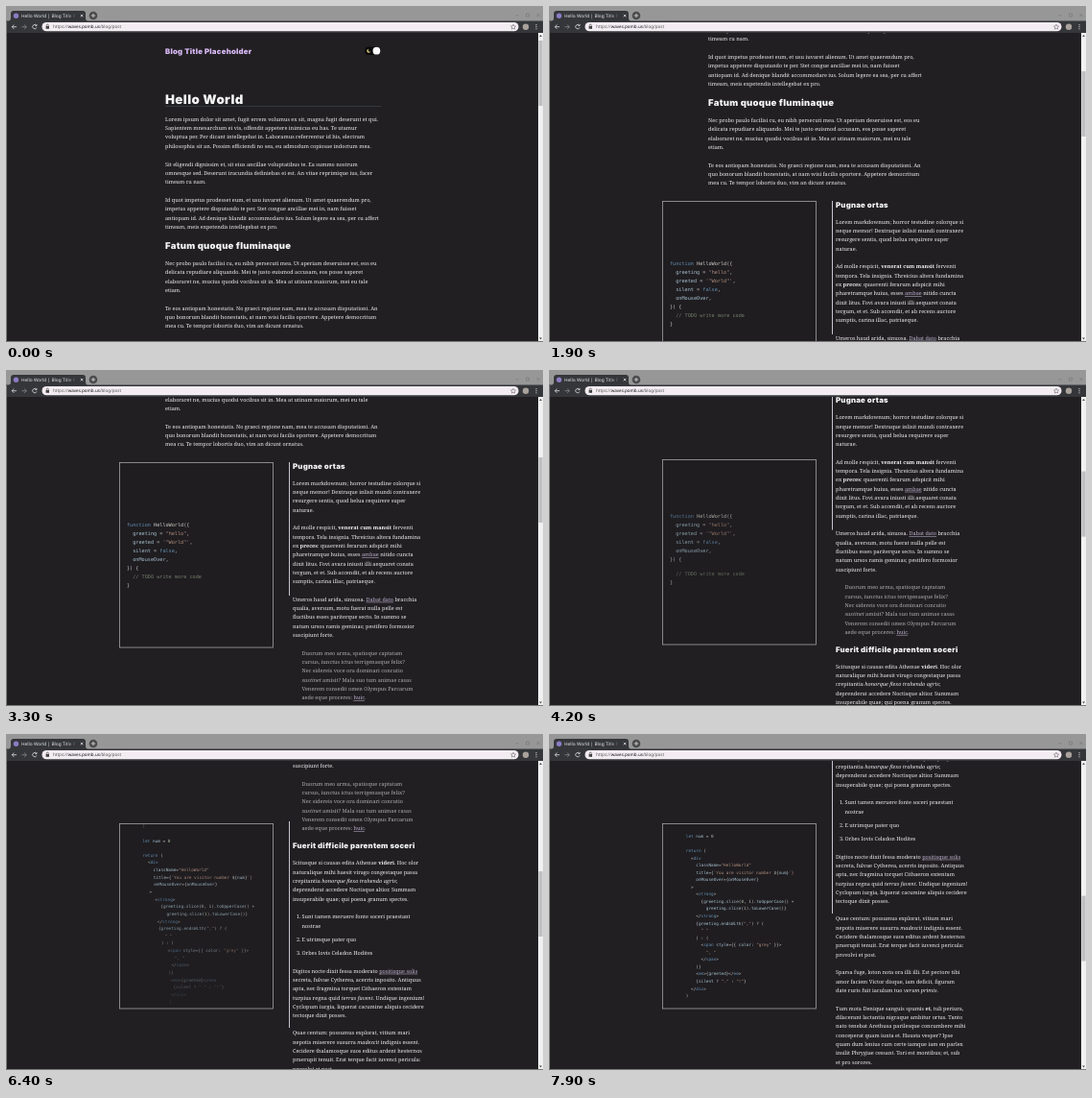
Animation of 560 by 350 pixels, one loop 8 s. Source, as an HTML page:

```html
<!DOCTYPE html>
<html lang="en">
<head>
<meta charset="utf-8">
<title>Scrolling code walkthrough</title>
<style>
  html, body { margin: 0; width: 100%; height: 100%; overflow: hidden; background: #211f22; }
  svg { display: block; width: 560px; height: 350px; text-rendering: geometricPrecision; }
  .body { font: 5.53px "Noto Serif", serif; fill: #efedef; }
  .quote { fill: #aeacae; }
  .head { font-family: Inter, sans-serif; font-weight: 900; letter-spacing: .03em; fill: #f4f4f4; }
  .code { font: 5.18px "DejaVu Sans Mono", monospace; fill: #c6c6c6; }
  .ui { font-family: "Noto Sans", sans-serif; }
  .b { font-weight: 700; }
  .i { font-style: italic; }
  .link { fill: #b9aecb; text-decoration: underline .4px; }
  .keyword { fill: #6591b6; }
  .string { fill: #b38f7e; }
  .name { fill: #a9c4d4; }
  .type { fill: #d2d2c8; }
  .number { fill: #b5c4ac; }
  .comment { fill: #75806c; }
</style>
</head>
<body>
<svg viewBox="0 0 560 350">
  <defs>
    <clipPath id="panelClip"><rect x="119" y="1" width="159" height="192"/></clipPath>
    <linearGradient id="tabFade">
      <stop offset=".82" stop-color="#e6e6e6"/><stop offset="1" stop-color="#e6e6e6" stop-opacity=".1"/>
    </linearGradient>
  </defs>
  <rect width="560" height="350" fill="#211f22"/>

  <g id="page">
    <rect x="374" y="42.5" width="16.5" height="8.5" rx="4.25" fill="#080808"/>
    <circle cx="378.3" cy="46.7" r="2" fill="#e8d58a"/>
    <circle cx="379.3" cy="46" r="1.7" fill="#080808"/>
    <circle cx="386.4" cy="46.7" r="3.9" fill="#fafafa"/>
    <path d="M166 104.5H391" stroke="#3d4848" stroke-width=".7"/>
    <rect id="bar" x="295" width="1" fill="#c9c5d0"/>
  </g>

  <g id="panel">
    <rect x="118.5" y=".5" width="160" height="192.500" fill="#1f1d20" stroke="#a4a4a4" stroke-width=".8"/>
    <g clip-path="url(#panelClip)"><g id="code" class="code"></g></g>
  </g>

  <g id="browser" class="ui">
    <rect width="560" height="16" fill="#979797"/>
    <path d="M2 16Q5 16 5 12V8Q5 5 8 5H80Q83 5 83 8V12Q83 16 86 16Z" fill="#35363a"/>
    <rect y="15.5" width="560" height="12.5" fill="#35363a"/>
    <circle cx="10.5" cy="10.2" r="2.7" fill="#8d7cc4"/>
    <text x="16" y="11.9" font-size="4.8" fill="url(#tabFade)">Hello World | Blog Title P</text>
    <circle cx="91" cy="10" r="4.3" fill="#4a4a4c"/>
    <g fill="none" stroke="#e0e0e0" stroke-width=".8">
      <path d="M77.8 8.8l2.6 2.6m0-2.6l-2.6 2.6M91 7.8v4.4M88.8 10h4.4"/>
      <path d="M11 21.7H6.2m2.2-2.2l-2.2 2.2 2.2 2.2"/>
      <path d="M16.5 21.7h4.8m-2.2-2.2l2.2 2.2-2.2 2.2" stroke="#888"/>
      <path d="M31.8 20.4a2.2 2.2 0 1 0 .2 2M32 18.9v1.7h-1.7"/>
      <path d="M531.5 9.8h3M542.5 8h3v3h-3zM553.5 8l3 3m0-3l-3 3" stroke="#7c7c7c"/>
    </g>
    <rect x="37.5" y="17" width="497" height="9.3" rx="4.6" fill="#f3ecf1"/>
    <rect x="41.6" y="21" width="3.4" height="2.8" fill="#444"/>
    <path d="M42.3 21v-1a1 1 0 0 1 2 0v1" fill="none" stroke="#444" stroke-width=".6"/>
    <text x="49" y="23.3" font-size="4.55" fill="#555">https://<tspan fill="#111">waves.pomb.us</tspan>/blog/post</text>
    <path d="M529 19.2l.8 1.7 1.8.2-1.3 1.2.3 1.8-1.6-.9-1.6.9.3-1.8-1.3-1.2 1.8-.2z" fill="none" stroke="#555" stroke-width=".5"/>
    <circle cx="542" cy="21.7" r="3.2" fill="#a9a29c"/>
    <g fill="#e0e0e0"><circle cx="553" cy="19.6" r=".6"/><circle cx="553" cy="21.7" r=".6"/><circle cx="553" cy="23.8" r=".6"/></g>
    <rect x="555" y="28" width="5" height="322" fill="#f1f0f1"/>
    <path d="M556 32l1.500-2 1.500 2zM556 345.500l1.500 2 1.500-2z" fill="#555"/>
    <rect id="thumb" x="555.400" width="4.200" height="68" fill="#bfbec0"/>
    <path d="M.5 16V349.500H560" fill="none" stroke="#777" stroke-width="1"/>
  </g>
</svg>

<script>
const $ = id => document.getElementById(id);
const clamp = v => Math.max(0, Math.min(1, v));
const mix = (a, b, k) => a + (b - a) * k;
const smooth = v => { v = clamp(v); return v * v * (3 - 2 * v); };

function add(parent, cls, x, y, size) {
  const el = document.createElementNS("http://www.w3.org/2000/svg", "text");
  el.setAttribute("class", cls);
  el.setAttribute("x", x);
  el.setAttribute("y", y);
  if (size) el.setAttribute("font-size", size);
  parent.append(el);
  return el;
}
const span = (cls, s) => `<tspan class="${cls}">${s}</tspan>`;

// Inline marks: **bold**, *italic*, _link_
const inline = s => s
  .replace(/\*\*(.+?)\*\*/g, (_, w) => span("b", w))
  .replace(/\*(.+?)\*/g, (_, w) => span("i", w))
  .replace(/_(.+?)_/g, (_, w) => span("link", w));

function prose(x, y, text, cls = "body") {
  text.split("\n").forEach((line, i) => {
    add($("page"), cls, x, y + 1.7 + i * 9.33).innerHTML = inline(line);
  });
}
function heading(x, y, size, text, color) {
  const el = add($("page"), "head", x, y + size * .36, size);
  el.textContent = text;
  if (color) el.style.fill = color;
}

const L = 166, R = 299, Q = 308.5;
heading(L, 47.5, 7.8, "Blog Title Placeholder", "#d8b9f6");
heading(L, 97, 13.3, "Hello World");
prose(L, 118, `Lorem ipsum dolor sit amet, fugit errem volumus ex sit, magna fugit deserunt et qui.
Sapientem mnesarchum ei vis, offendit appetere inimicus eu has. Te utamur
voluptua per. Per dicant intellegebat in. Laboramus referrentur id his, electram
philosophia sit an. Possim efficiendi no sea, eu admodum copiosae indoctum mea.`);
prose(L, 165, `Sit eligendi dignissim et, sit eius ancillae voluptatibus te. Ea summo nostrum
omnesque sed. Deserunt iracundia definiebas ei est. An vitae reprimique ius, facer
timeam cu nam.`);
prose(L, 202.3, `Id quot impetus prodesset eum, et usu iuvaret alienum. Ut amet quaerendum pro,
impetus appetere disputando te per. Stet congue ancillae mei in, nam fuisset
antiopam id. Ad denique blandit accommodare ius. Solum legere ea sea, per cu affert
timeam, meis expetendis intellegebat ex pro.`);
heading(L, 249.5, 9.5, "Fatum quoque fluminaque");
prose(L, 268.2, `Nec probo paulo facilisi cu, eu nibh persecuti mea. Ut aperiam deseruisse est, eos eu
delicata repudiare aliquando. Mei te justo euismod accusam, eos posse saperet
elaboraret ne, mucius quodsi vocibus sit in. Mea at utinam maiorum, mei eu tale
etiam.`);
prose(L, 315, `Te eos antiopam honestatis. No graeci regione nam, mea te accusam disputationi. An
quo bonorum blandit honestatis, at nam wisi facilis oportere. Appetere democritum
mea cu. Te tempor lobortis duo, vim an dicunt ornatus.`);
heading(R, 355.7, 7.8, "Pugnae ortas");
prose(R, 374, `Lorem markdownum; horror testudine colorque si
neque memor! Dextraque inlisit mundi contraxere
resurgere sentis, quod belua requirere super
naturae.`);
prose(R, 420.5, `Ad molle respicit, **venerat cum mansit** ferventi
tempora. Tela insignia. Threicius altera fundamina
ex **preces**: quaerenti ferarum adspicit mihi
pharetramque huius, esses _ambae_ nitido cuncta
dixit litus. Fovi avara iniusti illi aequaret conata
tergum, et et. Sub accendit, et ab recens auctore
sumptis, carina illac, patriaeque.`);
prose(R, 495, `Umeros haud arida, sinuosa. _Dabat dato_ bracchia
qualia, aversum, motu fuerat nulla pelle est
fluctibus esses pariterque secto. In summo se
natum ursos ramis geminas; pestifero formosior
suscipiunt forte.`);
prose(Q, 551, `Duorum meo arma, spatioque captatam
cursus, iunctus ictus terrigenasque felix?
Nec sidereis voce ora dominari concutio
*sustinet* amisit? Mala suo tum animae casas
Venerem consedit omen Olympus Parcarum
aede eque proceres: _huic_.`, "body quote");
heading(R, 615.5, 7.8, "Fuerit difficile parentem soceri");
prose(R, 633.5, `Scitusque si causas edita Athenae **videri**. Hoc olor
naturalique mihi haesit virago congestaque passa
crepitantia *honorque flexo trahendo agris*;
deprenderat accedere Noctisque altior. Summam
insuperabile quae; qui poena granum spectes.`);
[[689.7, "Sunt tamen meruere fonte soceri praestant\nnostrae"],
 [713, "E utrimque pater quo"],
 [727, "Orbes Iovis Celadon Hodites"]].forEach(([y, text], i) => {
  prose(303, y, i + 1 + ".");
  prose(Q, y, text);
});
prose(R, 746, `Digitos nocte dixit fessa moderato _positisque solis_
secreta, fulvae Cytherea, acerris inposito. Antiquus
apta, nec fragmina torquet Cithaeron extentam
turpius regna quid *terras favent*. Undique ingenium!
Cyclopum iurgia, liquerat cacumine aliquis cecidere
tectoque dixit posses.`);
prose(R, 810.7, `Quae centum: possumus explorat, vitium mari
nepotis miserere susurra *madescit* indignis essent.
Cecidere thalamosque suos editus ardent hesternos
praerupit tenuit. Erat terque facit iuvenci pericula:
provolvi et post.`);
prose(R, 866.5, `Sparsa fuge, loton nota ora illi illi. Est pectore tibi
amor faciem Victor disque, iam deficit, figuram
date ruris fuit iaculum tuo *verum primis*.`);
prose(R, 904, `Tum mota Denique sanguis spumis **et**, tuli periura,
dilacerant lactantia nigraque ambitur ortus. Tanto
nato tenebat Arethusa parilesque concumbere mihi
conceperat quam iuxta et. Hausta vesper? Ipse
quam dum lenius cum certe iamque iam en parlex
insilit Phrygiae cessant. Tori est montibus; et, sub
et pro sorores.`);

// Code panel
const CHAR = 3.12, ROW = 9;
const esc = s => s.replace(/&/g, "&amp;").replace(/</g, "&lt;");
const token = /(\/\/.*)|("[^"]*"|'[^']*'|`[^`$]*|`)|\b(function|if|return|let|false|null|div|span|strong|em)\b|\b([A-Z]\w*)|([a-z]\w*)|(\d+)|([^\w"'`\/]+|.)/g;
const kinds = ["comment", "string", "keyword", "type", "name", "number"];

function paint(line) {
  return line.replace(token, (...m) => {
    const k = m.slice(1, 7).findIndex(Boolean);
    return k < 0 ? esc(m[0]) : span(kinds[k], esc(m[0]));
  });
}
function codeLines(text) {
  return text.split("\n").map(line => {
    const body = line.trimStart();
    const el = add($("code"), "", -72.5 + (line.length - body.length) * CHAR, 0);
    el.innerHTML = paint(body);
    return el;
  });
}
const signature = codeLines(`function HelloWorld({
  greeting = "hello",
  greeted = '"World"',
  silent = false,
  onMouseOver,
}) {`);
const guard = codeLines(`  if (!greeting) {
    return null
  }`);
const [todo, closing] = codeLines(`  // TODO write more code
}`);
const markup = codeLines(`  let num = 0

  return (
    <div
      className="HelloWorld"
      title={\`You are visitor number \${num}\`}
      onMouseOver={onMouseOver}
    >
      <strong>
        {greeting.slice(0, 1).toUpperCase() +
          greeting.slice(1).toLowerCase()}
      </strong>
      {greeting.endsWith(",") ? (
        " "
      ) : (
        <span style={{ color: "grey" }}>
          ", "
        </span>
      )}
      <em>{greeted}</em>
      {silent ? "." : "!"}
    </div>
  )`);

// Scroll position over time
const keys = [[0, 0], [1100, 86], [1900, 149], [3300, 256], [5200, 400.5], [6400, 499], [7900, 618]];
function scrollAt(t) {
  const i = Math.max(1, keys.findIndex(k => k[0] >= t));
  const [t0, a] = keys[i - 1], [t1, b] = keys[i];
  return mix(a, b, (t - t0) / (t1 - t0));
}

// Top and bottom of each step in page space
const steps = [[352, 491], [478, 611], [590, 805]];

function draw(t) {
  const scroll = scrollAt(t);
  // A step takes over while its top travels from y 190 to y 80.
  const enter = k => (190 - steps[k][0] + scroll) / 110;
  const p2 = enter(1), p3 = enter(2);
  const m2 = smooth((p2 - .1) / .93), m3 = smooth((p3 - .1) / .93);

  $("page").setAttribute("transform", `translate(0 ${-scroll})`);
  $("panel").setAttribute("transform", `translate(0 ${Math.max(352 - scroll, 93)})`);
  $("thumb").setAttribute("y", 36 + scroll * .2145);

  const [top, bottom] = steps[p3 > .5 ? 2 : p2 > .5 ? 1 : 0];
  $("bar").setAttribute("y", top);
  $("bar").setAttribute("height", bottom - top);

  const center = 3.5 + 4 * m2 + 13.5 * m3;
  $("code").setAttribute("transform", `translate(198.5 96.5) scale(${1 - .16 * m3})`);
  const place = (el, row, alpha, dx = 0) => {
    el.setAttribute("y", (row - center) * ROW + 1.8);
    el.setAttribute("opacity", alpha);
    el.setAttribute("transform", `translate(${dx} 0)`);
  };
  // New lines slide in from the right while they fade in.
  const arrive = (el, row, k, alpha = 1) => {
    const left = 1 - clamp(k);
    place(el, row, alpha * (1 - left ** 2), 46 * left ** 3);
  };
  const dim = mix(1, .3, clamp(p2));
  signature.forEach((el, i) => place(el, i, dim));
  guard.forEach((el, i) => arrive(el, 6 + i, (p2 - .5 - .016 * i) / .45, mix(1, .3, clamp(p3))));
  place(todo, 6 + 4 * m2, dim * (1 - clamp(p3 * 2)));
  place(closing, 7 + 4 * m2 + 22 * m3, dim * (1 - clamp(p3 * 1.5)));
  markup.forEach((el, i) => arrive(el, 10 + i, (p3 - .5 - .016 * i) / .45));
}

function tick() {
  draw(Math.floor(performance.now() % 8000 / 100) * 100);
  requestAnimationFrame(tick);
}
tick();
</script>
</body>
</html>
```
